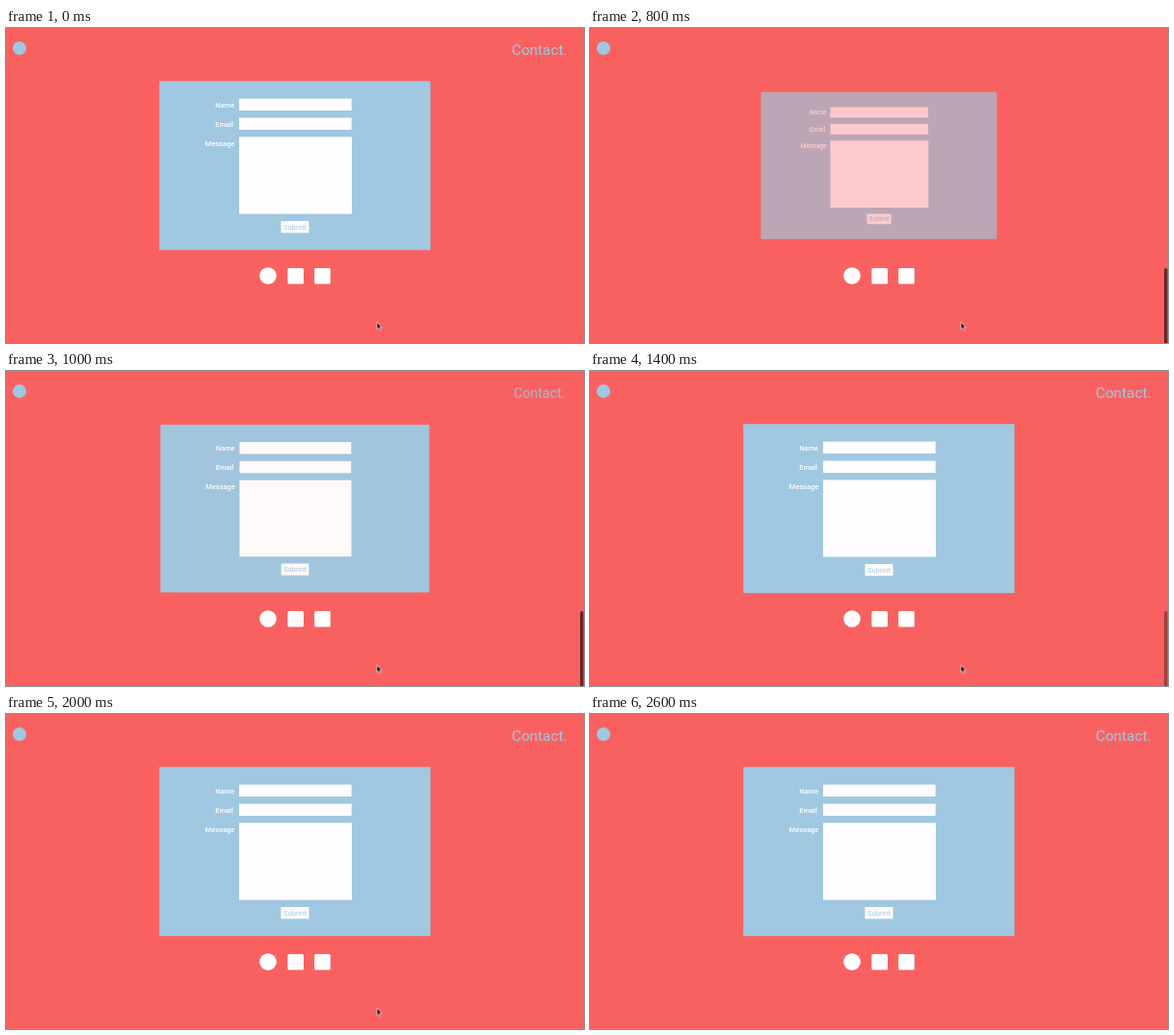
Recreate the animation shown at these times as an HTML page. Size 600 px wide and 328 px high, loop 3.6 s.

```html
<!DOCTYPE html>
<html lang="en">
<head>
<meta charset="utf-8">
<title>Contact form</title>
<style>
  @property --p { syntax: "<number>"; inherits: false; initial-value: 1; }

  html, body { margin: 0; width: 100%; height: 100%; overflow: hidden; background: #f96161; }
  svg { display: block; width: 600px; height: 328px; font-family: Roboto, sans-serif; }

  .blue { fill: #a0c8e0; }
  .white { fill: #fffdff; }
  .label { font-size: 7.5px; font-weight: 500; }
  .button { font-size: 7.6px; text-anchor: middle; }
  .title { font-size: 15.3px; text-anchor: middle; }

  .form, .title, .bar, .cursor { animation: 3.6s step-end infinite; }

  /* --p is the progress of a reveal: fade in while growing from 60% */
  .form, .title { opacity: var(--p); transform: scale(calc(.6 + .4 * var(--p))); }
  .form { transform-origin: 300px 143.2px; animation-name: form; }
  .title { transform-origin: 553.7px 22px; animation-name: title; }
  .bar { fill: #300c0c; animation-name: bar; }
  .cursor { animation-name: cursor; }

  @keyframes form {
    0% { --p: 1; }
    19.44% { --p: .167; }
    22.22% { --p: .675; }
    24.99% { --p: .91; }
    27.77% { --p: .98; }
    30.55%, 100% { --p: 1; }
  }
  @keyframes title {
    0% { --p: 1; }
    19.44% { --p: 0; }
    22.22% { --p: .03; }
    24.99% { --p: .5; }
    27.77% { --p: .82; }
    30.55% { --p: .945; }
    33.33% { --p: .985; }
    36.11%, 100% { --p: 1; }
  }
  @keyframes bar {
    0% { opacity: 0; }
    19.44% { opacity: .7; }
    36.11% { opacity: .6; }
    38.88% { opacity: .42; }
    41.66% { opacity: .18; }
    44.44%, 100% { opacity: 0; }
  }
  @keyframes cursor {
    0% { transform: translate(385px, 306.3px); opacity: 1; }
    69.44% { transform: translate(398px, 265.3px); opacity: 1; }
    72.22%, 100% { transform: translate(398px, 265.3px); opacity: 0; }
  }
</style>
</head>
<body>
<svg viewBox="0 0 600 328">
  <rect width="600" height="328" fill="#f96161"/>
  <circle class="blue" cx="14" cy="21" r="7"/>
  <text class="title blue" x="553.7" y="28">Contact.</text>

  <g class="form">
    <rect class="blue" x="159.2" y="55.2" width="281.4" height="176"/>
    <g class="label white">
      <text x="217.2" y="82.5">Name</text>
      <text x="217.2" y="102.5">Email</text>
      <text x="206.6" y="122.5">Message</text>
    </g>
    <g class="white">
      <rect x="242" y="73.5" width="116.7" height="12.5"/>
      <rect x="242" y="93.5" width="116.7" height="12.5"/>
      <rect x="242" y="113.4" width="117" height="80.2"/>
      <rect x="285.5" y="201" width="29" height="12.3"/>
    </g>
    <text class="button blue" x="300" y="209.6">Submit</text>
  </g>

  <g class="white">
    <circle cx="272" cy="258" r="8.8"/>
    <rect x="292.4" y="250" width="16.6" height="16.6" rx="1.5"/>
    <rect x="320.2" y="250" width="16.6" height="16.6" rx="1.5"/>
  </g>

  <rect class="bar" x="596" y="250" width="3.4" height="80" rx="1.7"/>
  <path class="cursor" d="M0 0V7.4L1.7 5.9L2.8 8.5L4 8L2.9 5.4H5.1Z" fill="#111" stroke="#fff" stroke-width=".6"/>
</svg>
</body>
</html>
```
